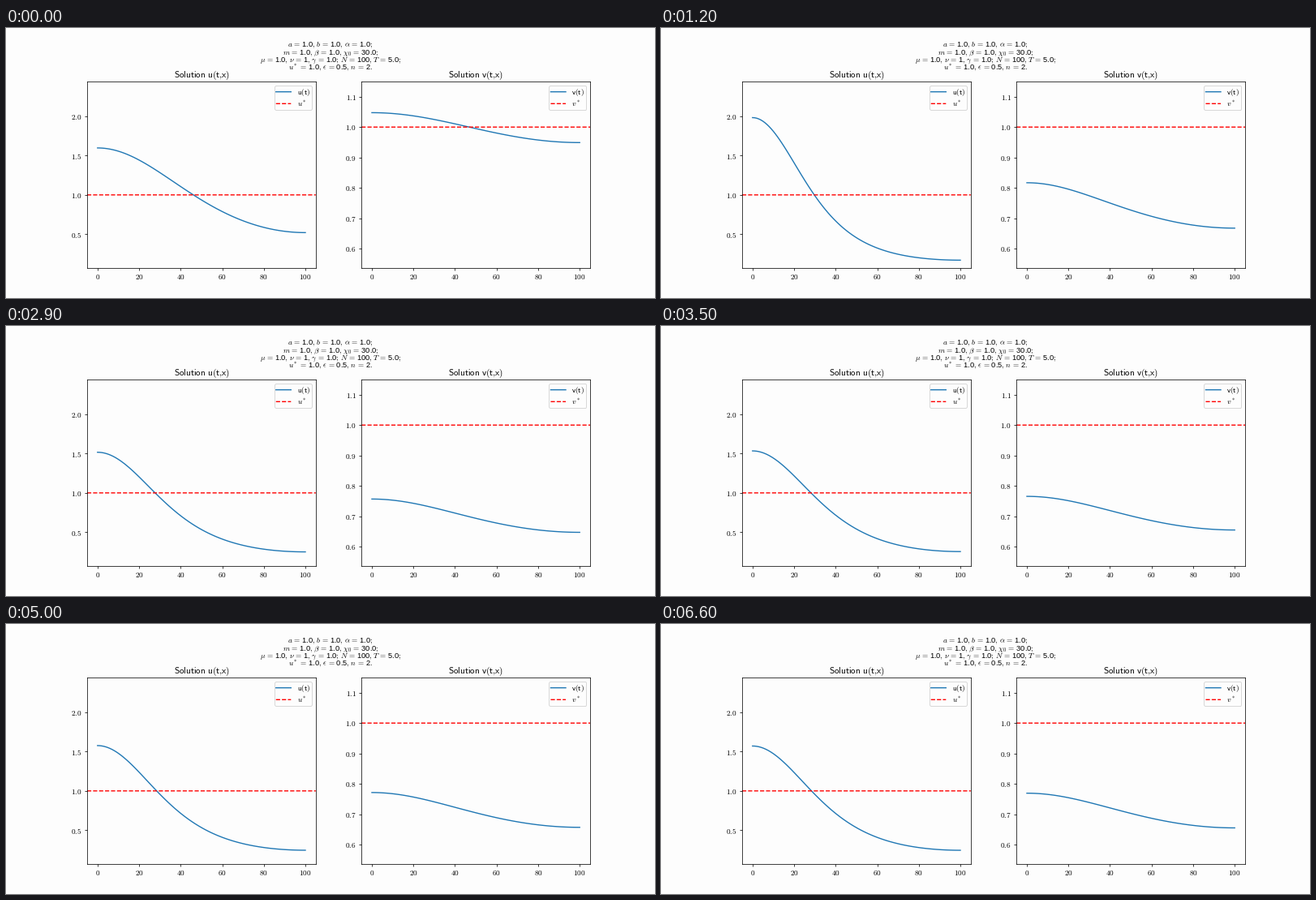
Write a matplotlib script that moves like this. It is 800 px wide and 333 px high and loops after 6700 ms.

```python
import numpy as np
import matplotlib.pyplot as plt
from matplotlib.animation import FuncAnimation

W, H, DPI = 800, 333, 64
FRAMES, INTERVAL = 67, 100
PAPER = "#fdfdfd"

plt.rcParams.update({
    "mathtext.fontset": "cm",
    "figure.facecolor": PAPER,
    "axes.facecolor": PAPER,
    "xtick.major.pad": 2.6,
    "legend.borderpad": 0.22,
    "legend.labelspacing": 0.17,
})
# Style sizes are meant for 200/3 dpi; rescale them for 64.
for key in ("font.size", "lines.linewidth", "axes.linewidth", "axes.titlepad",
            "patch.linewidth", "xtick.major.size", "xtick.major.width",
            "xtick.major.pad", "ytick.major.size", "ytick.major.width",
            "ytick.major.pad"):
    plt.rcParams[key] *= 25 / 24

# Chemotaxis model on [0, 1] with no-flux ends, solved in cosine modes:
#   u_t = u_xx - CHI (u v_x / (1 + v))_x + u (1 - u),   0 = v_xx - v + u
CHI, EPS = 30.0, 0.5
MODES, NODES = 16, 40
DT, FIRST, EVERY = 0.0005, 50, 150

k = np.pi * np.arange(MODES)
nodes = (np.arange(NODES) + 0.5) / NODES
C, S = np.cos(np.outer(nodes, k)), np.sin(np.outer(nodes, k))
weight = np.where(k > 0, 2, 1)[:, None] / NODES
to_cos, to_sin = weight * C.T, weight * S.T
green = 1 / (1 + k**2)


def rate(a):
    u, b = C @ a, green * a
    flux = -CHI * u * (S @ (k * b)) / (1 + C @ b)
    return -k**2 * a - k * (to_sin @ flux) + to_cos @ (u * (1 - u))


def advance(a, steps):
    for _ in range(steps):
        r1 = rate(a)
        r2 = rate(a + DT / 2 * r1)
        r3 = rate(a + DT / 2 * r2)
        r4 = rate(a + DT * r3)
        a = a + DT / 6 * (r1 + 2 * r2 + 2 * r3 + r4)
    return a


def solve():
    a = np.zeros(MODES)
    a[:2] = 1, EPS
    states = [advance(a, FIRST)]
    while len(states) < FRAMES:
        states.append(advance(states[-1], EVERY))
    return np.array(states)


x = np.arange(101)
basis = np.cos(np.outer(k, x / 100))
states = solve()
curves = {"u": states @ basis, "v": (states * green) @ basis}


def header(line):
    gap = r"\hspace{0.13}"
    parts = []
    for item in line.split():
        name, value = item.split("=")
        number = rf"\mathregular{{{value[:-1]}}}"
        parts.append(f"{name}{gap}={gap}{number}{value[-1]}")
    return "$" + gap.join(parts) + r"\!$"


def panel(ax, name, ylim, yticks):
    line, = ax.plot(x, curves[name][0], color="tab:blue",
                    label=rf"$\mathsf{{{name}(t)}}$")
    ax.axhline(1, color="red", ls="--", snap=False,
               label=rf"${name}^\ast$")
    ax.set(xlim=(-5, 105), ylim=ylim)
    ax.set_xticks(range(0, 101, 20), [f"${t}$" for t in range(0, 101, 20)])
    ax.set_yticks(yticks, [f"${t:.1f}$" for t in yticks])
    ax.set_title(rf"$\mathsf{{Solution\ {name}(t{{,}}x)}}$")
    for handle in ax.legend(loc="upper right").get_lines():
        handle.set_snap(False)
    return line


fig, axes = plt.subplots(1, 2, figsize=(W / DPI, H / DPI), dpi=DPI)
fig.subplots_adjust(left=0.125, right=0.9, bottom=0.11, top=0.801, wspace=0.2)

for i, text in enumerate((r"a=1.0, b=1.0, \alpha=1.0;",
                          r"m=1.0, \beta=1.0, \chi_0=30.0;",
                          r"\mu=1.0, \nu=1, \gamma=1.0; N=100, T=5.0;",
                          r"u^\ast=1.0, \epsilon=0.5, n=2.")):
    fig.text(0.5, 1 - (23.1 + 9.4 * i) / H, header(text),
             family="Liberation Sans", ha="center", va="baseline")

lines = {
    "u": panel(axes[0], "u", (0.064, 2.443), np.arange(1, 5) / 2),
    "v": panel(axes[1], "v", (0.536, 1.149), np.arange(6, 12) / 10),
}


def draw(i):
    for name, line in lines.items():
        line.set_ydata(curves[name][i])
    return list(lines.values())


anim = FuncAnimation(fig, draw, frames=FRAMES, interval=INTERVAL,
                     repeat=True, repeat_delay=0)
plt.show()
```
